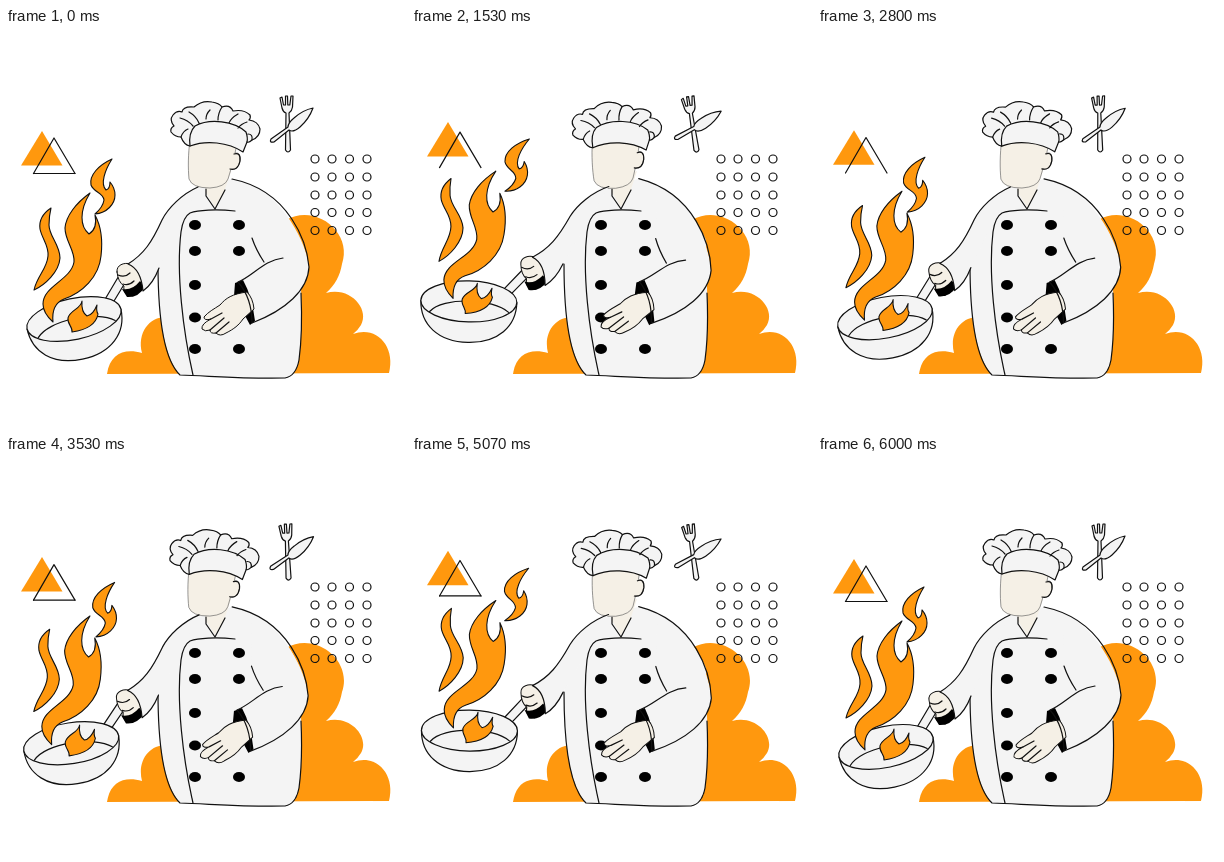
Write an HTML page that moves like this. It is 400x400 px and loops after 6.03 s.

```html
<!DOCTYPE html>
<html lang="en">
<head>
<meta charset="utf-8">
<title>Chef</title>
<style>
html, body { margin: 0; width: 100%; height: 100%; overflow: hidden; background: #fff; }
svg { display: block; width: 100vw; height: 100vh; }
path, ellipse, circle { stroke-linecap: round; stroke-linejoin: round; }
.line { fill: none; stroke: #111; stroke-width: 1.2; }
.fill { fill: #f4f4f4; }
.cloth { fill: #f4f4f4; stroke: #111; stroke-width: 1.2; }
.skin { fill: #f5f0e6; stroke: #111; stroke-width: 1; }
.flame { fill: #ff980e; stroke: #111; stroke-width: 1.1; }
.orange { fill: #ff980e; }
</style>
</head>
<body>
<!-- data-swing: dx dy degrees pivotX pivotY, all at full swing -->
<svg viewBox="0 0 400 400">
  <path class="orange" d="M101 346C104 326 118 320 136 325C131 305 143 289 160 289L280 192C310 175 347 205 336 236C334 248 329 257 320 265C344 258 364 281 355 297Q352 302 347 306C370 297 390 318 383 345Z"/>

  <path class="orange" data-swing="0 -9 0 0 0" d="M36 103L56.500 137.500H15Z"/>
  <g data-swing="0 -6 0 0 0" class="line">
    <path d="M27.500 145.500L48 110L69 145.500"/>
    <path id="base" d="M27.500 145.500H69"/>
  </g>

  <g id="dots" class="line"></g>

  <g data-swing="-1 0 -8 284 97">
    <path class="cloth" d="M274 70L276 80Q277 84 280 85L279.500 122Q282 126 284.500 122L283 85Q286 83 286.500 79L287 68L285 68L283.800 77L281.800 77L281.500 68L279.500 68L279.500 77L277.500 77L276 69Z"/>
  </g>
  <g data-swing="0 0 8 285 97">
    <path class="cloth" d="M265 111Q263 115 268 114L283 102Q287 105 294 99Q303 91 307 80Q297 82 288 90Q282 95 282 99Z"/>
  </g>

  <!-- jacket -->
  <path class="fill" d="M192 159C175 166 163 178 157 193L152 240C152 284 157 328 174 347L279 350Q290 348 293 332C296 310 296 288 295 260L294 212C280 180 254 156 226 151Z"/>
  <path class="line" d="M152 236C152 284 156 330 174 347C205 348 240 351 279 350Q290 348 293 332C296 310 296 288 295 265"/>
  <path class="skin" style="stroke:none" d="M198 150L200 165L209 179L218 164L225 143Z"/>
  <path class="line" d="M200 161L200 168L209 181L219 162"/>
  <path class="line" d="M229 183C210 181 192 182 184 185Q177 189 175 204C170 245 177 303 187 347"/>
  <g id="buttons"></g>

  <g data-swing="0 0 -4 208 165">
    <path class="skin" style="stroke:#555;stroke-width:.6" d="M184 112C182 126 182 141 183 151Q186 160 204 160Q219 159 222 151L225 141Q232 143 234 133Q235 124 229 125L232 112Z"/>
    <path class="line" d="M224 141Q232 143 234 133Q235 124 228 126"/>
    <path class="cloth" d="M184 118Q178 117 175 109Q169 109 165 104Q164 100 168 98Q163 92 167 87Q171 82 176 84Q177 78 188 79Q196 72 206 74Q213 75 216 79Q224 76 227 83Q238 81 244 87Q245 90 243 92Q252 93 254 101Q254 109 246 112Q243 115 241 114L237 124C222 114 200 112 184 118Z"/>
    <path class="line" d="M184 118C183 110 185 102 189 98C204 90 228 93 240 104Q242 110 241 114M175 109Q177 103 182 101M174 90Q182 92 187 98M183 84Q190 88 193 95M204 82Q200 86 200 91M216 79Q212 85 212 92M232 86Q225 90 223 95M241 94Q235 96 232 100M246 112Q247 106 242 106"/>
  </g>

  <g data-swing="-2.500 -4 13.500 122 247">
    <path class="cloth" d="M98 273L114 246L125 245L105 278Z"/>
    <g transform="translate(68 291) rotate(-12)">
      <path class="cloth" d="M-48 0C-48 24 -30 41 0 41S48 24 48 0Z"/>
      <ellipse class="cloth" rx="48" ry="20.500"/>
      <path class="line" d="M-39 11C-26 -4 24 -4 40 10"/>
    </g>
  </g>

  <path class="flame" data-swing="-6 -24 2.600 47 294" d="M84 165C70 175 60 188 59 200C59 213 69 222 68 234C65 252 37 258 37 276Q37 285 47 294C46 284 48 275 58 271C76 265 93 249 95 228C97 211 95 198 89 187C91 197 88 203 83 206C74 199 73 183 84 165Z"/>
  <path class="flame" data-swing="-1 -29 -3.500 28 262" d="M45 180C36 186 33 194 34 201C36 211 43 217 42 228C41 241 31 248 28 262C39 257 53 244 54 230C54 217 43 208 43 197Q43 188 45 180Z"/>
  <path class="flame" data-swing="4 -23 8 90 186" d="M106 131C93 137 83 147 85 157C88 165 97 164 98 172Q97 179 89 186C101 185 109 176 109 167Q109 160 104 154Q104 161 100 162C94 156 99 142 106 131Z"/>
  <path class="flame" data-swing="-12 -18 4 76 290" d="M76 273C75 281 64 282 62 290C61 296 67 299 66 304C80 302 90 297 92 286Q90 283 91 277Q87 287 81 288Q75 284 76 273Z"/>

  <!-- pan arm -->
  <g data-swing="0 0 5 200 215">
    <path class="skin" d="M111 244C110 237 118 234 125 236L133 241Q140 252 137 260L127 268C120 268 117 263 118 258Q112 254 111 244Z"/>
    <path class="line" d="M112 247Q119 250 124 245M117 256Q123 258 128 253"/>
    <path d="M116 261Q126 263 134 253L139 259Q132 270 121 269Z"/>
    <path class="fill" d="M192 159C176 166 162 180 156 192C146 214 138 226 122 236Q135 241 137 263Q147 256 154 238L172 200Z"/>
    <path class="line" d="M192 159C176 166 162 180 156 192C146 214 138 226 122 236Q135 241 137 263Q147 256 153 240"/>
  </g>

  <!-- resting arm -->
  <g data-swing="0 0 3 235 165">
    <path class="fill" d="M245 157C277 170 301 215 303 239C302 262 280 282 246 295L232 254C247 247 258 240 262 233L246 210Z"/>
    <path d="M229 255L237 252Q246 268 249 293L244 297Q235 280 228 268Z"/>
    <path class="skin" d="M241 264C226 266 220 270 214 277C208 281 202 284 198 289Q198 293 205 291Q195 296 196 301Q199 304 204 302Q204 306 210 305Q214 309 220 305C228 301 233 297 237 291L248 281Q247 270 241 264Z"/>
    <path class="line" d="M205 291L216 285M204 302L218 290M210 305L223 294"/>
    <path class="line" d="M226 151C284 163 301 215 303 239C302 262 280 282 246 295Q246 270 232 254C247 248 258 232 277 230M246 210Q250 222 258 234"/>
  </g>
</svg>
<script>
const LOOP = 6030, CYCLE = LOOP / 2;
const $ = id => document.getElementById(id);

for (const y of [131, 149, 167, 184.5, 202.5])
  for (const x of [309, 326, 343.5, 361])
    $('dots').innerHTML += `<circle cx="${x}" cy="${y}" r="4"/>`;
for (const [x, y] of [[189, 197], [233, 197], [189, 223], [233, 223], [189, 257], [189, 289.5], [189, 321], [233, 321]])
  $('buttons').innerHTML += `<ellipse cx="${x}" cy="${y}" rx="6" ry="5"/>`;

const parts = [...document.querySelectorAll('[data-swing]')]
  .map(el => [el, el.dataset.swing.split(' ').map(Number)]);
const ease = u => (1 - Math.cos(Math.PI * Math.min(1, Math.max(0, u)))) / 2;

// Slow lift, short rest, quicker return
const swing = t => t < 1850 ? ease(t / 1650) : 1 - ease((t - 1850) / (CYCLE - 1850));

function draw(now) {
  const t = now % LOOP, s = swing(t % CYCLE);
  for (const [el, [dx, dy, deg, cx, cy]] of parts)
    el.setAttribute('transform', `translate(${dx * s} ${dy * s}) rotate(${deg * s} ${cx} ${cy})`);
  $('base').style.visibility = t > 1330 && t < CYCLE ? 'hidden' : 'visible';
}

const start = performance.now();
function tick() {
  draw(performance.now() - start);
  requestAnimationFrame(tick);
}
tick();
</script>
</body>
</html>
```
